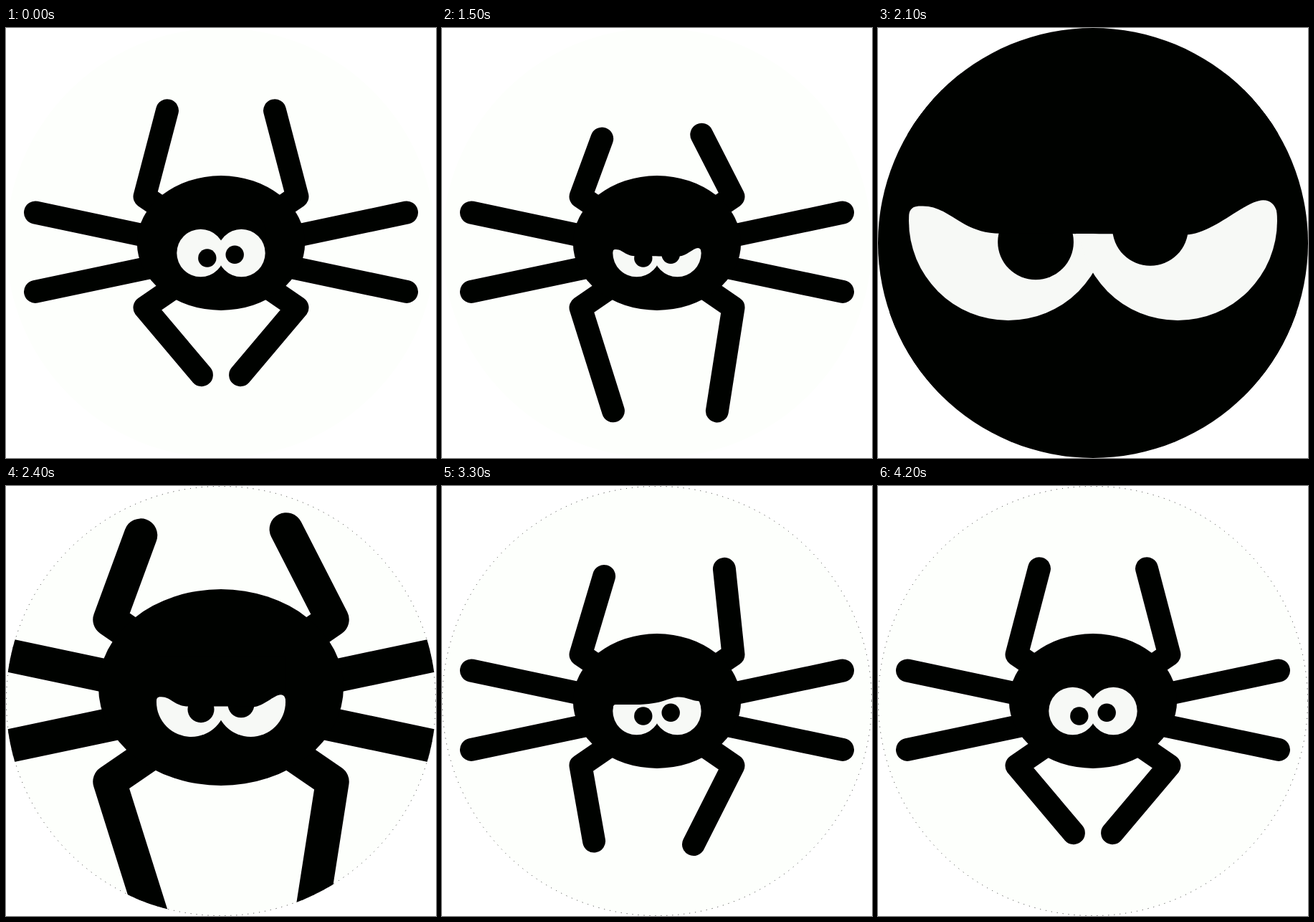
An HTML page for the animation above (4.5 s loop, 600 by 600 pixels).

```html
<!DOCTYPE html>
<html lang="en">
<head>
<meta charset="utf-8">
<title>Spider</title>
<style>
  html, body { margin: 0; width: 100%; height: 100%; overflow: hidden; background: #fff; }
  svg { display: block; width: 100vw; height: 100vh; }
</style>
</head>
<body>
<svg viewBox="0 0 600 600">
  <clipPath id="disc"><circle cx="300" cy="300" r="300"/></clipPath>
  <g clip-path="url(#disc)">
    <circle cx="300" cy="300" r="300" fill="#fdfffc"/>
    <g id="spider" fill="#000200">
      <path id="legs" fill="none" stroke="#000200" stroke-width="32" stroke-linecap="round" stroke-linejoin="round"/>
      <ellipse cx="300" cy="300" rx="117.2" ry="93.9"/>
      <g fill="#f7f9f6">
        <circle cx="271.6" cy="314" r="33.3"/>
        <circle cx="328.4" cy="314" r="33.3"/>
      </g>
      <circle cx="280.8" cy="321" r="12.7"/>
      <circle cx="319.2" cy="316.3" r="12.7"/>
      <path id="lid"/>
    </g>
  </g>
  <circle id="rim" cx="300" cy="300" r="299.6" fill="none" stroke="#000200" stroke-width=".8" stroke-dasharray="1 7"/>
</svg>
<script>
const STEP = 300, STEPS = 15, PEAK = 7;
const $ = id => document.getElementById(id);

// Value at a fractional position in a list of keys
function between(keys, at) {
  const i = Math.floor(at), a = keys[i], b = keys[i + 1] ?? a;
  return a + (b - a) * (at - i);
}

// Shin length and inward angle in degrees while resting, walking and pouncing
const shins = [
  { side: -1, up: -1, length: [124, 114, 86], angle: [14.7, 16.6, 20.2] },
  { side: 1, up: -1, length: [124, 120, 97], angle: [14.7, 6, 27.1] },
  { side: -1, up: 1, length: [123, 107, 151], angle: [40.2, 10, 17.5] },
  { side: 1, up: 1, length: [123, 123, 146], angle: [40.2, 26.8, 8.9] }
];

// Lid heights while open, drowsy, tilted and angry
const lidHeights = {
  left: [270, 294.5, 305, 309],
  innerLeft: [270, 294.5, 305, 318.2],
  innerRight: [270, 294.5, 294.5, 318.6],
  right: [270, 300, 300, 307]
};

function legPath({ side, up, length, angle }, step) {
  const point = (dx, dy) => `${300 + side * dx} ${312.7 + up * dy}`;
  const speed = side < 0 ? 0.5 : 1;
  const stage = Math.min(2, Math.max(Math.min(step * speed, 1), (step - 1) / 2));
  const reach = between(length, stage), turn = between(angle, stage) * Math.PI / 180;
  const tip = point(106.5 - reach * Math.sin(turn), 77.5 + reach * Math.cos(turn));
  return `M${point(60, 45.5)}L${point(106.5, 77.5)}L${tip}M${point(100, 21.6)}L${point(259, 55.2)}`;
}

function lidPath(step) {
  const stage = Math.min(3, (step + (step > 2)) / 2);
  const [l, a, b, r] = Object.values(lidHeights).map(keys => between(keys, stage));
  return `M237.8 314C238.5 ${l} 240 ${l} 243 ${l}C252 ${l} 256 ${a} 269 ${a}` +
    `C310 ${a} 315 ${b} 331 ${b}C340 ${b} 351 ${r} 357 ${r}C361 ${r} 362 ${r + 4} 362 314V270H237.8Z`;
}

function draw(step) {
  const [zoom, y] = step === PEAK ? [4.165, 211] : step === PEAK - 1 ? [1.459, 281] : [1, 300];
  $('legs').setAttribute('d', shins.map(shin => legPath(shin, step)).join(''));
  $('lid').setAttribute('d', lidPath(step));
  $('spider').setAttribute('transform', `translate(300 ${y}) scale(${zoom}) translate(-300 -300)`);
}

let shown = -1;
function tick() {
  const step = Math.floor(performance.now() / STEP) % STEPS;
  if (step !== shown) {
    shown = step;
    draw(PEAK - Math.abs(PEAK - step));
    $('rim').style.display = step > PEAK ? '' : 'none';
  }
  requestAnimationFrame(tick);
}
tick();
</script>
</body>
</html>
```
